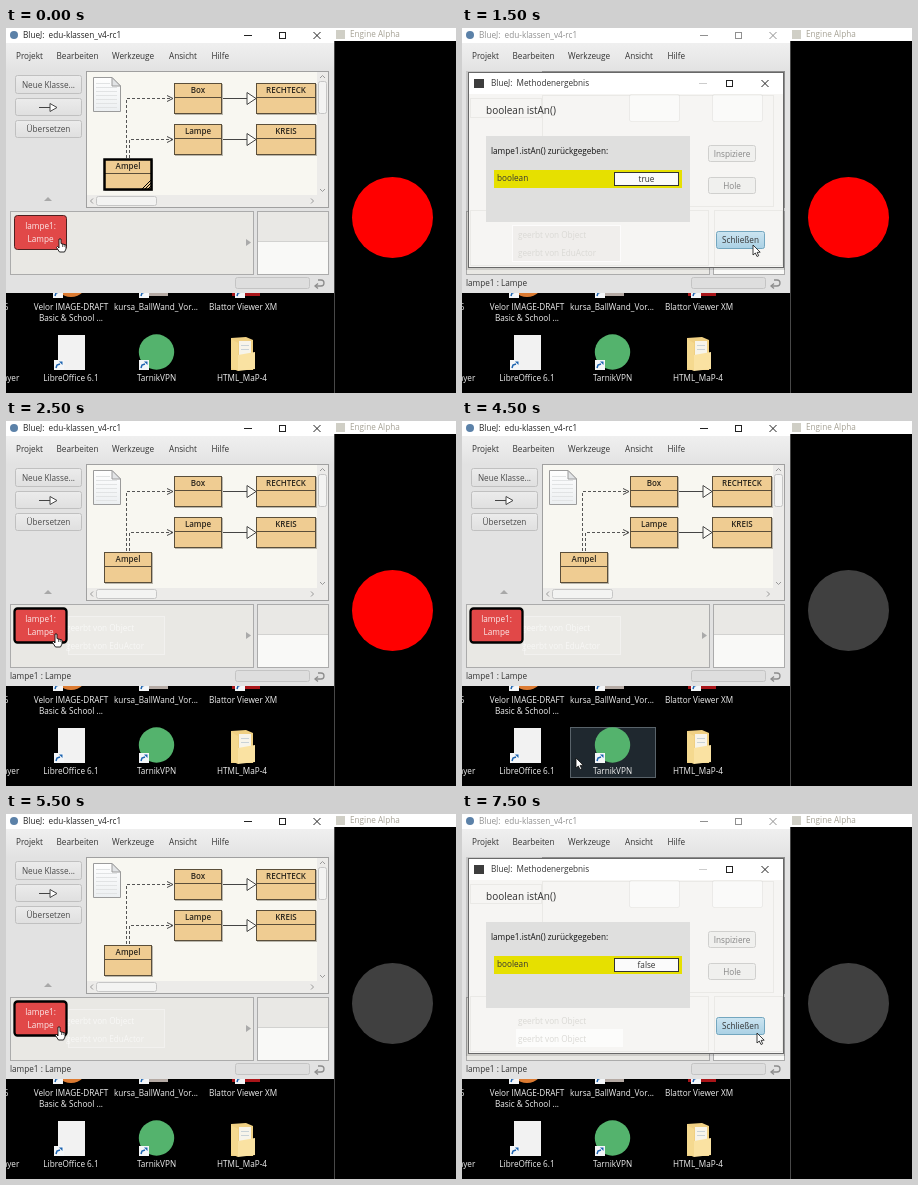
These frames come from a looping animation (450x365 px, 8 s). An HTML page with a canvas:

```html
<!DOCTYPE html>
<html lang="de">
<head>
<meta charset="utf-8">
<title>Klassenkarte</title>
<style>
  html, body { margin: 0; width: 450px; height: 365px; overflow: hidden; background: #000; }
  canvas { display: block; }
</style>
</head>
<body>
<canvas id="stage" width="450" height="365"></canvas>
<script>
const ctx = document.getElementById("stage").getContext("2d");
const LOOP = 8000;
const UI = '"Open Sans", "Noto Sans", sans-serif';
const INK = "#333";

// Each scene holds until the next one starts.
const scenes = [
  { at: 0, lit: true, ampel: true, hand: [54, 211] },
  { at: 500, lit: true, picked: true, menu: 7, arrow: [137, 355] },
  { at: 1500, lit: true, picked: true, dialog: "true", arrow: [291, 217] },
  { at: 2500, lit: true, picked: true, ghost: 2, hand: [50, 213] },
  { at: 3500, lit: true, picked: true, ghost: 1, menu: 6, arrow: [114, 337] },
  { at: 4500, picked: true, ghost: 2, hover: true, arrow: [114, 337] },
  { at: 5500, picked: true, ghost: 2, hand: [53, 213] },
  { at: 6500, picked: true, ghost: 1, menu: 7, arrow: [137, 355] },
  { at: 7500, picked: true, dialog: "false", arrow: [295, 219] }
];

function rect(x, y, w, h, fill, stroke, width = 1) {
  if (fill) { ctx.fillStyle = fill; ctx.fillRect(x, y, w, h); }
  if (stroke) {
    ctx.strokeStyle = stroke;
    ctx.lineWidth = width;
    ctx.strokeRect(x + .5, y + .5, w - 1, h - 1);
  }
}

function round(x, y, w, h, r, fill, stroke, width = 1) {
  ctx.beginPath();
  ctx.roundRect(x + .5, y + .5, w - 1, h - 1, r);
  if (fill) { ctx.fillStyle = fill; ctx.fill(); }
  if (stroke) { ctx.strokeStyle = stroke; ctx.lineWidth = width; ctx.stroke(); }
}

function path(points, stroke, fill, closed = !!fill, width = 1) {
  ctx.beginPath();
  points.forEach(([x, y]) => ctx.lineTo(x, y));
  if (closed) ctx.closePath();
  if (fill) { ctx.fillStyle = fill; ctx.fill(); }
  if (stroke) { ctx.strokeStyle = stroke; ctx.lineWidth = width; ctx.stroke(); }
}

function disc(x, y, r, fill) {
  ctx.fillStyle = fill;
  ctx.beginPath();
  ctx.arc(x, y, r, 0, Math.PI * 2);
  ctx.fill();
}

function text(s, x, y, color = INK, align = "left", font = "8.2px " + UI) {
  ctx.font = font;
  ctx.textAlign = align;
  ctx.fillStyle = color;
  ctx.fillText(s, x, y);
}

function shade(y0, y1, from, to) {
  const g = ctx.createLinearGradient(0, y0, 0, y1);
  g.addColorStop(0, from);
  g.addColorStop(1, to);
  return g;
}

function windowButtons(xMin, xMax, xClose, y, color, minColor = color) {
  path([[xMin - 4, y + .5], [xMin + 4, y + .5]], minColor);
  rect(xMax - 4, y - 3, 7, 7, null, color);
  path([[xClose - 3.5, y - 3], [xClose + 3.5, y + 4]], color);
  path([[xClose + 3.5, y - 3], [xClose - 3.5, y + 4]], color);
}

function shortcut(x, y) {
  rect(x, y, 10, 10, "#f4f6f8");
  path([[x + 2, y + 8], [x + 3, y + 5], [x + 6, y + 4]], "#1d64b0", null, false, 1.5);
  path([[x + 5, y + 1.5], [x + 8.5, y + 1.5], [x + 8.5, y + 5]], null, "#1d64b0");
}

function folder(x, y) {
  path([[x, y + 1], [x + 15, y], [x + 22, y + 3], [x + 22, y + 33], [x, y + 33]], null, "#f0d083");
  rect(x + 8, y + 4, 12, 16, "#f7f4ea");
  path([[x + 10, y + 8.5], [x + 18, y + 8.5]], "#c9d2d6");
  path([[x + 10, y + 12.5], [x + 18, y + 12.5]], "#c9d2d6");
  path([[x, y + 2], [x + 7, y + 6], [x + 7, y + 34], [x, y + 31]], null, "#f5d98f");
  path([[x + 7, y + 18], [x + 24, y + 15], [x + 24, y + 32], [x + 7, y + 34]], null, "#fae2a2");
}

function desktop(s) {
  rect(0, 0, 450, 365, "#000");
  if (s.hover) rect(108, 306, 86, 51, "#1f282f", "#59636a");
  disc(65, 252, 17, "#dc7b32");
  rect(140, 240, 22, 28, "#b5aaa4");
  rect(226, 240, 28, 28, "#a91519");
  shortcut(47, 260);
  shortcut(133, 260);
  shortcut(229, 260);
  rect(52, 307, 27, 35, "#f2f2f2");
  disc(150.5, 324, 17.7, "#54b36d");
  folder(225, 309);
  shortcut(48, 332);
  shortcut(133, 332);
  const name = (t, x, y) => text(t, x, y, "#f1f1f1", "center");
  name("6", 0, 282);
  name("Velor IMAGE-DRAFT", 65, 282);
  name("Basic & School ...", 65, 293);
  name("kursa_BallWand_Vor...", 150, 282);
  name("Blattor Viewer XM", 237, 282);
  name("ayer", 5, 353);
  name("LibreOffice 6.1", 65, 353);
  name("TarnikVPN", 150.5, 353);
  name("HTML_MaP-4", 236, 353);
}

function engine(lit) {
  rect(328, 0, 122, 365, "#000");
  rect(328, 0, 1, 365, "#484848");
  rect(328, 0, 122, 13, "#fff");
  rect(330, 2, 9, 9, "#d0cfc6");
  text("Engine Alpha", 344, 9, "#a5a194");
  disc(386.5, 189.5, 40.5, lit ? "#f00" : "#404040");
}

function button(x, y, w, h, label) {
  round(x, y, w, h, 2, shade(y, y + h, "#ececec", "#dfdfdf"), "#c0c0c0");
  if (label) text(label, x + w / 2, y + h / 2 + 3, "#4a4a4a", "center");
}

function classBox(x, y, w, name, selected) {
  rect(x + 1, y + 1, w, 31, "#b9b6ac");
  rect(x, y, w, 31, "#efcc92", "#5a4e3a");
  path([[x, y + 14.5], [x + w, y + 14.5]], "#5a4e3a");
  text(name, x + w / 2, y + 10, "#2b261d", "center", "600 8px " + UI);
  if (!selected) return;
  rect(x, y, w, 31, null, "#000", 2.5);
  for (const d of [4, 7, 10]) path([[x + w - d, y + 30], [x + w, y + 30 - d]], "#000");
}

function dashedArrow(x, y) {
  ctx.setLineDash([3, 2]);
  path([[x, 130], [x, y], [166, y]], "#555");
  ctx.setLineDash([]);
  path([[161, y - 3], [167, y], [161, y + 3]], "#444");
}

function inherits(y) {
  path([[217, y], [241, y]], "#444");
  path([[241, y - 6], [250, y], [241, y + 6]], "#444", "#fdfcf7");
}

function diagram(ampelSelected) {
  rect(80, 43, 243, 137, "#ecebe9", "#a0a0a0");
  rect(81, 44, 230, 123, "#f8f7f1");
  round(312, 53, 9, 33, 2, "#f3f3f2", "#c6c6c6");
  path([[314, 50], [316.5, 47.5], [319, 50]], "#999");
  path([[314, 161], [316.5, 163.5], [319, 161]], "#999");
  round(90, 168, 61, 10, 2, "#f3f3f2", "#c6c6c6");
  path([[87, 170.5], [84.5, 173], [87, 175.5]], "#999");
  path([[305, 170.5], [307.5, 173], [305, 175.5]], "#999");

  path([[87.5, 49.5], [106, 49.5], [114.5, 58], [114.5, 83.5], [87.5, 83.5]], "#9b9b9b", shade(49, 84, "#fff", "#eceff1"));
  path([[106, 49.5], [106, 58], [114.5, 58]], "#9b9b9b", "#e2e4e6");
  for (let y = 55.5; y < 81; y += 4) path([[90, y], [y < 59 ? 104 : 111, y]], "#e1e3e4");

  dashedArrow(120.5, 70.5);
  dashedArrow(123.5, 111.5);
  inherits(70.5);
  inherits(111.5);
  classBox(168, 55, 48, "Box");
  classBox(168, 96, 48, "Lampe");
  classBox(250, 55, 60, "RECHTECK");
  classBox(250, 96, 60, "KREIS");
  classBox(98, 131, 48, "Ampel", ampelSelected);
}

function bench(s) {
  rect(4, 183, 244, 64, "#e9e8e4", "#ababab");
  rect(251, 183, 72, 64, "#e9e8e5", "#ababab");
  rect(252, 213, 70, 33, "#f9f9f7");
  path([[252, 213.5], [322, 213.5]], "#d2d2d0");
  path([[240, 211], [245, 214.5], [240, 218]], null, "#aaa");
  if (s.ghost) {
    rect(62, 195, 97, 39, "rgba(255,255,255,.12)", "rgba(255,255,255,.3)");
    text("geerbt von Object", 60, 210, "rgba(255,255,255,.65)");
    if (s.ghost > 1) text("geerbt von EduActor", 60, 228, "rgba(255,255,255,.6)");
  }
  round(8, 187, 53, 35, 3, "#e14848", s.picked ? "#000" : "#4d2020", s.picked ? 2.3 : 1);
  text("lampe1:", 34.5, 201, "#fbeaea", "center");
  text("Lampe", 34.5, 213.5, "#fbeaea", "center");
}

function mainWindow(s) {
  rect(0, 0, 328, 265, shade(14, 44, "#f0f0f0", "#e2e2e2"));
  rect(0, 0, 328, 15, "#fff");
  disc(8, 7, 4, "#5b81a8");
  const muted = s.dialog ? "#909090" : "#222";
  text("BlueJ:  edu-klassen_v4-rc1", 17, 10, muted);
  windowButtons(242, 277, 311, 7, muted);
  [["Projekt", 10], ["Bearbeiten", 50.5], ["Werkzeuge", 106], ["Ansicht", 163], ["Hilfe", 205.5]]
    .forEach(([label, x]) => text(label, x, 31));
  button(9, 47, 67, 19, "Neue Klasse...");
  button(9, 70, 67, 18);
  path([[33, 79.5], [45, 79.5]], "#444");
  path([[44, 75.5], [51, 79.5], [44, 83.5]], "#444", "#fff");
  button(9, 92, 67, 18, "Übersetzen");
  path([[38, 173], [42, 169], [46, 173]], null, "#a8a8a8");
  diagram(s.ampel);
  bench(s);
  if (s.picked) text("lampe1 : Lampe", 4, 258);
  round(229, 249, 75, 12, 2, "#dedede", "#c4c4c4");
  ctx.beginPath();
  ctx.moveTo(312, 252);
  ctx.lineTo(315, 252);
  ctx.arc(315, 255, 3, -Math.PI / 2, Math.PI / 2);
  ctx.lineTo(310, 258);
  ctx.strokeStyle = "#8c8c8c";
  ctx.lineWidth = 1.3;
  ctx.stroke();
  path([[312, 255.5], [309, 258], [312, 260.5]], "#8c8c8c", null, false, 1.3);
}

function contextMenu(active) {
  rect(53, 213, 110, 152, "rgba(0,0,0,.22)");
  rect(54, 213, 107, 152, "#f5f5f4", "#c9c9c9");
  const inherited = ["Object", "EduActor", "Geometrie", "Kreis", "KREIS"];
  const rows = [...inherited.map(n => "geerbt von " + n), "void an()", "void aus()", "boolean istAn()"];
  path([[55, 308.5], [160, 308.5]], "#b9b9b9");
  rows.forEach((label, i) => {
    const mid = 226 + i * 18 + (i > 4 ? 2 : 0);
    if (i === active) rect(54, mid - 9, 107, 18, "#0096c9");
    text(label, 59, mid + 3, i === active ? "#fff" : "#333");
    if (i < inherited.length) path([[154, mid - 2.5], [157, mid], [154, mid + 2.5]], null, "#444");
  });
}

function dialog(value) {
  rect(4, 43, 319, 199, "rgba(0,0,0,.12)");
  rect(6, 44, 316, 196, "#f6f5f3", "#686868");
  rect(7, 45, 314, 21, "#fff");
  rect(12, 51, 10, 9, "#3d3d3d");
  text("BlueJ:  Methodenergebnis", 29, 58);
  windowButtons(241, 268, 303, 55, "#222", "#ccc");

  // Faint remains of the window behind.
  const faint = "rgba(90,90,80,.08)";
  rect(8, 70, 72, 20, null, faint);
  rect(80, 67, 232, 112, null, faint);
  rect(8, 182, 239, 56, null, faint);
  rect(252, 182, 69, 56, null, faint);
  for (const x of [167, 250]) round(x, 66, 51, 28, 2, "rgba(255,255,255,.5)", faint);

  text("boolean istAn()", 24, 86, INK, "left", "10px " + UI);
  rect(24, 108, 204, 86, "#dfdfde");
  text("lampe1.istAn() zurückgegeben:", 29, 126, "#111");
  rect(32, 142, 188, 18, "#e6e000");
  text("boolean", 35, 153);
  rect(152, 144, 65, 14, "#fbfbfb", "#333");
  text(value, 184.5, 154, INK, "center");
  for (const [label, y] of [["Inspiziere", 117], ["Hole", 149]]) {
    round(246, y, 48, 17, 2, "#f0f0ee", "#d0d0ce");
    text(label, 270, y + 11.5, "#858585", "center");
  }
  round(254, 203, 49, 18, 2, shade(203, 221, "#cde5f1", "#a9d0e4"), "#73a6bf");
  text("Schließen", 278.5, 215, INK, "center");

  const fresh = value === "true";
  if (fresh) rect(50, 197, 109, 37, "rgba(225,223,218,.3)", "rgba(255,255,255,.8)");
  else rect(54, 215, 107, 18, "rgba(255,255,255,.7)");
  text("geerbt von Object", 56, 210, "#dad9d5");
  text(fresh ? "geerbt von EduActor" : "geerbt von Object", 56, 228, "#dad9d5");
}

function arrowCursor([x, y]) {
  path([[0, 0], [0, 10], [2.3, 8], [4, 11.5], [5.7, 10.7], [4.1, 7.4], [7.2, 7.2]]
    .map(([dx, dy]) => [x + dx, y + dy]), "#111", "#fff", true, .8);
}

function handCursor([x, y]) {
  path([[-1, 0], [1, 0], [1, 4.5], [6, 6], [6, 10], [4.5, 13], [-.5, 13], [-3.5, 8.5], [-2.5, 7.5], [-1, 9]]
    .map(([dx, dy]) => [x + dx, y + dy]), "#111", "#fff", true, .9);
  path([[x + 2.5, y + 5], [x + 2.5, y + 8]], "#111", null, false, .6);
  path([[x + 4.2, y + 5.5], [x + 4.2, y + 8]], "#111", null, false, .6);
}

function draw() {
  const t = performance.now() % LOOP;
  const s = scenes.findLast(scene => scene.at <= t);
  desktop(s);
  engine(s.lit);
  mainWindow(s);
  if (s.menu) contextMenu(s.menu);
  if (s.dialog) dialog(s.dialog);
  if (s.hand) handCursor(s.hand);
  if (s.arrow) arrowCursor(s.arrow);
  requestAnimationFrame(draw);
}
draw();
</script>
</body>
</html>
```
